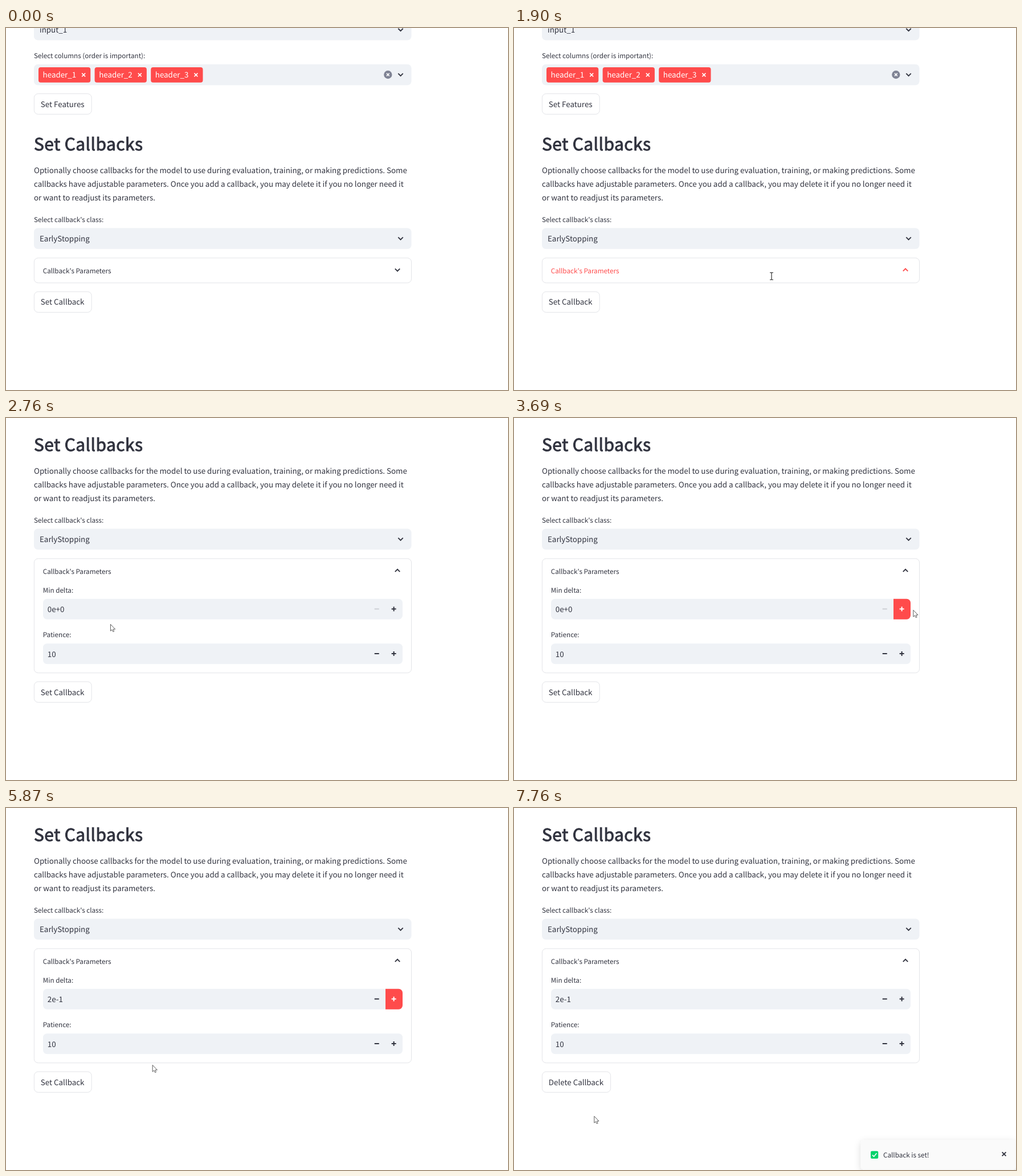
An HTML page that plays this animation: 881x636 px, repeating every 8000 ms.

```html
<!DOCTYPE html>
<html lang="en">
<head>
<meta charset="utf-8">
<title>Set Callbacks</title>
<style>
html, body { margin: 0; width: 100%; height: 100%; overflow: hidden; background: #fff; }
svg { display: block; width: 881px; height: 636px; }
text {
  font: 13.36px "Noto Sans CJK JP", "Noto Sans CJK SC", "Noto Sans", sans-serif;
  fill: #31333f; white-space: pre; text-rendering: geometricPrecision;
}
.small { font-size: 11.69px; }
.head { font-size: 29.9px; letter-spacing: .47px; stroke: #31333f; stroke-width: .95; }
.white { fill: #fff; }
.field { fill: #eff2f6; }
.frame { fill: #fff; stroke: #e3e4e8; }
.line { fill: none; stroke: #31333f; stroke-width: 1.9; }
</style>
</head>
<body>
<svg id="stage" viewBox="0 0 881 636"></svg>
<script>
const LOOP = 8000, GROW = 157, RED = '#ff4b4b', DARK = '#31333f';
const stage = document.getElementById('stage');

const text = (x, y, s, cls = '', id = '') => `<text x="${x}" y="${y}" class="${cls}" id="${id}">${s}</text>`;
const rect = (x, y, w, h, r, cls, id = '') =>
  `<rect x="${x}" y="${y}" width="${w}" height="${h}" rx="${r}" class="${cls}" id="${id}"/>`;
const chevron = (x, y, id = '') => `<path id="${id}" class="line" d="M${x - 4.2} ${y - 2.1}l4.2 4.2l4.2 -4.2"/>`;
const cross = (x, y, r, color, w) =>
  `<path d="M${x - r} ${y - r}l${2 * r} ${2 * r}m0 ${-2 * r}l${-2 * r} ${2 * r}" stroke="${color}" stroke-width="${w}"/>`;
const select = (y, s) => rect(49, y, 662.5, 36.8, 7, 'field') + text(59, y + 23.7, s) + chevron(692.5, y + 18.4);
const tag = (x, s) => `<rect x="${x}" y="69" width="91.3" height="26.8" rx="4" fill="${RED}"/>` +
  text(x + 7.6, 87.3, s, 'white') + cross(x + 79.2, 82.4, 3, '#fff', 1.5);

// Number field: value, minus and plus button
const number = (y, label, value, id) =>
  text(64.7, y - 10.9, label, 'small') +
  rect(65, y, 631, 36, 7, 'field') +
  text(72.8, y + 23.3, value, '', id + 'Value') +
  `<path id="${id}Hot" fill="${RED}" visibility="hidden" d="M666 ${y}h23a7 7 0 0 1 7 7v22a7 7 0 0 1 -7 7h-23z"/>
   <path id="${id}Minus" stroke="${DARK}" stroke-width="2" d="M646.7 ${y + 17.7}h8"/>
   <path id="${id}Plus" stroke="${DARK}" stroke-width="2" d="M676.6 ${y + 17.9}h8m-4 -4v8"/>`;

stage.innerHTML = `
<defs>
  <clipPath id="fold"><rect x="49" y="404" width="663" height="44" id="foldBox"/></clipPath>
  <filter id="shade" x="-10%" y="-40%" width="120%" height="180%">
    <feDropShadow dx="0" dy="3" stdDeviation="6" flood-opacity=".14"/>
  </filter>
</defs>
<g id="page">
  ${select(-15.3, 'input_1')}
  ${text(49, 52.6, 'Select columns (order is important):', 'small')}
  ${rect(49, 63.8, 662.5, 36.8, 7, 'field')}
  ${tag(57, 'header_1')}${tag(155.6, 'header_2')}${tag(254.2, 'header_3')}
  <circle cx="670.3" cy="82" r="7.2" fill="#808495"/>${cross(670.3, 82, 2.4, '#fff', 1.5)}
  ${chevron(692.5, 82)}
  ${rect(49.4, 115.5, 100.8, 36, 7, 'frame')}${text(60.8, 139.1, 'Set Features')}
  ${text(48.9, 214.6, 'Set Callbacks', 'head')}
  ${text(49, 255.2, 'Optionally choose callbacks for the model to use during evaluation, training, or making predictions. Some')}
  ${text(49, 279.2, 'callbacks have adjustable parameters. Once you add a callback, you may delete it if you no longer need it')}
  ${text(49, 303.2, 'or want to readjust its parameters.')}
  ${text(49, 341, "Select callback's class:", 'small')}
  ${select(351.4, 'EarlyStopping')}
  ${rect(49.4, 404, 662.1, 43.8, 7, 'frame', 'expander')}
  ${text(64.7, 430.6, "Callback's Parameters", 'small', 'title')}
  ${chevron(687, 425, 'arrow')}
  <g clip-path="url(#fold)">
    ${number(474.7, 'Min delta:', '0e+0', 'delta')}
    ${number(553.2, 'Patience:', '10', 'patience')}
  </g>
</g>
${rect(49.4, 463.3, 100.8, 36.2, 7, 'frame', 'button')}
${text(60.8, 486.8, 'Set Callback', '', 'label')}
<g id="toast">
  <rect x="608.4" y="583.5" width="272" height="52" rx="6" fill="#fafafa" filter="url(#shade)"/>
  <rect x="626" y="602.8" width="13.2" height="13.2" rx="2" fill="#00d26a"/>
  <path d="M629 609.6l2.6 2.8l4.8 -5.8" fill="none" stroke="#fff" stroke-width="1.6"/>
  ${text(648, 614, 'Callback is set!', 'small')}
  ${cross(860, 608, 3.4, DARK, 1.9)}
</g>
<circle id="ring" r="10.5" fill="#ff0" fill-opacity=".47"/>
<g id="cursor" stroke-linejoin="round">
  <path id="point" fill="#fff" stroke="#4a4a4a" stroke-width=".9"
    d="M.8 .5V12.2L3.4 9.9L5.2 13.6L7.1 12.8L5.4 9.1H9Z"/>
  <path id="beam" fill="none" stroke="#222" stroke-width="1.1"
    d="M-3 -6.3h2.2l.8 .6l.8 -.6h2.2M-3 6.3h2.2l.8 -.6l.8 .6h2.2M0 -5.7v11.4"/>
  <path id="hand" fill="#fff" stroke="#333" stroke-width=".9"
    d="M-1.4 1.2Q0 -.8 1.4 1.2V6.2Q3 5.2 4 6.8Q5.6 5.8 6.4 7.5Q8 7 8.4 8.8V12.5Q8.2 15 6.8 16.5V18.5H-.6V16.5Q-2.6 14.5 -5.2 10.6Q-5.4 8.8 -3.4 9.2L-1.4 11Z"/>
</g>`;

const el = {};
stage.querySelectorAll('[id]').forEach(n => { if (n.id) el[n.id] = n; });
const set = (id, attrs) => { for (const k in attrs) el[id].setAttribute(k, attrs[k]); };
const show = (id, on) => set(id, { visibility: on ? 'visible' : 'hidden' });
const paint = (id, color) => { el[id].style.fill = color; };
const ramp = (t, a, b) => Math.min(1, Math.max(0, (t - a) / (b - a)));
const smooth = u => u * u * (3 - 2 * u);
const within = (t, a, b) => t >= a && t < b;

// Pointer stops: time, x, y
const PATH = [
  [0, 826, 640], [70, 805, 628], [790, 528, 493], [830, 528, 493], [1020, 476, 454], [1320, 452, 436],
  [1950, 452, 436], [2150, 438, 436], [2620, 250, 371], [2760, 182, 362], [3490, 645, 338],
  [3600, 690, 338], [3690, 700, 337], [3760, 700, 337], [4000, 677, 338], [5150, 677, 338],
  [5870, 257, 451], [5940, 213, 459], [5980, 213, 459], [6300, 122, 473], [7320, 122, 473], [7760, 140, 541], [LOOP, 140, 541]
];
const PRESSES = [[1680, 1830], [4230, 4300], [4710, 4780], [6360, 6500]];

function pointer(t) {
  const i = PATH.findIndex(p => p[0] > t);
  const [a, b] = [PATH[i - 1], PATH[i]];
  const u = ramp(t, a[0], b[0]);
  return [a[1] + (b[1] - a[1]) * u, a[2] + (b[2] - a[2]) * u];
}

// cubic-bezier(.23, 1, .32, 1)
function easeOut(x) {
  let lo = 0, hi = 1;
  for (let i = 0; i < 24; i++) {
    const s = (lo + hi) / 2, r = 1 - s;
    if (3 * r * r * s * .23 + 3 * r * s * s * .32 + s * s * s < x) lo = s; else hi = s;
  }
  return x >= 1 ? 1 : 1 - (1 - lo) ** 3;
}

function cursorKind(t, x, y) {
  if (t < 1950) return y < 448 ? 'beam' : 'point';
  if (x < 150 && y > 463 && y < 500) return 'hand';
  const inField = within(y, 318, 354) || within(y, 396, 432);
  if (inField && within(x, 65, 636)) return 'beam';
  return inField && within(x, 666, 696) ? 'hand' : 'point';
}

function draw(t) {
  const [x, y] = pointer(t);
  const kind = cursorKind(t, x, y);
  const grow = GROW * easeOut(ramp(t, 1940, 2310));

  set('page', { transform: `translate(0 ${-grow})` });
  set('expander', { height: 43.8 + grow });
  set('foldBox', { height: 43.8 + grow });

  const hover = t < 1980 && kind === 'beam';
  paint('title', hover ? RED : DARK);
  el.arrow.style.stroke = hover ? RED : DARK;
  set('arrow', { transform: t < 1830 ? '' : 'rotate(180 687 425)' });

  const hot = within(t, 3540, 6360);
  show('deltaHot', hot);
  set('deltaPlus', { stroke: hot ? '#fff' : DARK });
  set('deltaMinus', { 'stroke-opacity': .18 + .82 * ramp(t, 4300, 4510) });
  el.deltaValue.textContent = t < 4300 ? '0e+0' : t < 4780 ? '1e-1' : '2e-1';

  const done = t >= 6640, over = t > 6000 && kind === 'hand', down = within(t, 6360, 6500);
  el.label.textContent = done ? 'Delete Callback' : 'Set Callback';
  paint('label', down ? '#fff' : over ? RED : DARK);
  set('label', { y: t < 2200 ? 486.4 : 486.9 });
  set('button', { width: done ? 120.2 : 100.8 });
  el.button.style.fill = down ? RED : '#fff';
  el.button.style.stroke = over ? RED : '#e3e4e8';

  set('toast', { opacity: smooth(ramp(t, 6660, 7000)) });

  const at = `translate(${x.toFixed(2)} ${y.toFixed(2)})`;
  show('ring', PRESSES.some(p => within(t, ...p)));
  set('ring', { transform: at });
  set('cursor', { transform: at });
  for (const k of ['point', 'beam', 'hand']) show(k, t >= 70 && k === kind);
}

const start = performance.now();
function tick() {
  draw((performance.now() - start) % LOOP);
  requestAnimationFrame(tick);
}
draw(0);
requestAnimationFrame(tick);
</script>
</body>
</html>
```
